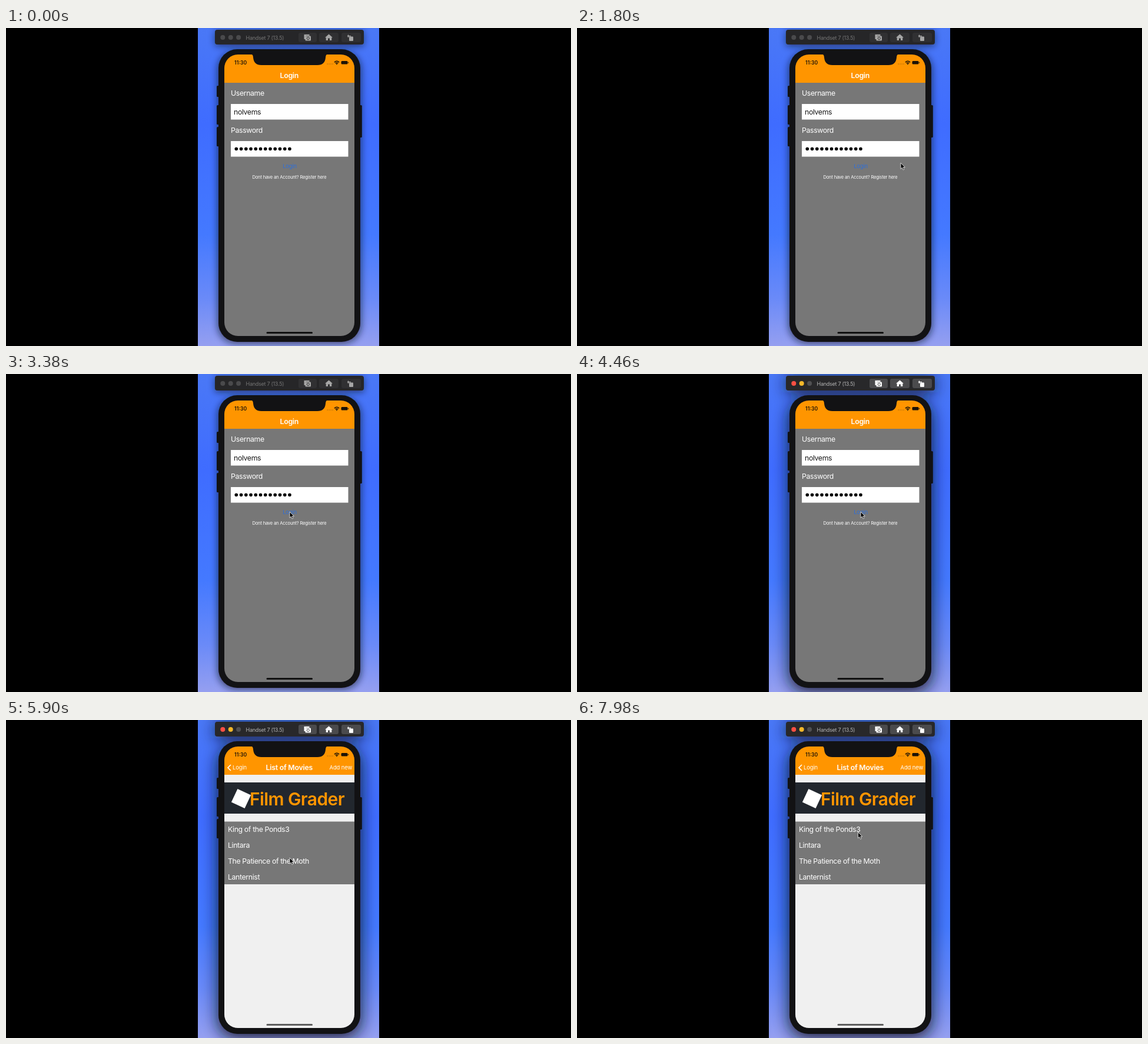
Recreate the animation shown at these times as an HTML page. Size 960 by 540 pixels, loop 8 s.

```html
<!DOCTYPE html>
<html lang="en">
<head>
<meta charset="utf-8">
<title>Phone login</title>
<style>
  html, body { margin: 0; width: 100%; height: 100%; overflow: hidden; background: #000; }
  svg { display: block; width: 960px; height: 540px; }
  text { font-family: Inter, Roboto, sans-serif; white-space: pre; }
</style>
</head>
<body>
<svg id="stage" viewBox="0 0 960 540"></svg>
<script>
const LOOP = 8000, ACTIVATE = 4240, PUSH = 5330;
const SCREEN = { x: 371, y: 45, w: 221, h: 478 };
const WHITE = '#fff', GRAY = '#777', ORANGE = '#ff9500', FRAME = '#121214', PALE = '#f0f0f0', INK = '#1c1306';

const rect = (x, y, w, h, fill, more = '') =>
  `<rect x="${x}" y="${y}" width="${w}" height="${h}" fill="${fill}" ${more}/>`;

// cy is the middle of the capital letters
function label(x, cy, str, size, { fill = WHITE, weight = 400, anchor = 'start', track = -0.03 } = {}) {
  return `<text x="${x}" y="${cy + size * 0.364}" font-size="${size}" font-weight="${weight}" fill="${fill}"
    text-anchor="${anchor}" letter-spacing="${track}em">${str}</text>`;
}

const title = (str) => label(481.3, 81, str, 12.3, { weight: 600, anchor: 'middle', track: -0.02 });

const field = (y) => rect(382, y, 199.5, 26.5, WHITE);

const bullets = Array.from({ length: 12 }, (_, i) =>
  `<circle cx="${391.3 + i * 8.24}" cy="205.3" r="2.8" fill="#000"/>`).join('');

const loginPage = rect(371, 93, 221, 430, GRAY)
  + label(382, 111, 'Username', 12.3) + field(129)
  + label(387, 142.5, 'nolvems', 12.3, { fill: '#1a1a1a' })
  + label(382, 174, 'Password', 12.3) + field(192) + bullets
  + label(482, 234.5, 'Login', 9.6, { fill: '#2f6fd8', anchor: 'middle' })
  + label(481.5, 253.5, 'Dont have an Account? Register here', 7.5, { anchor: 'middle', track: -0.02 });

const titles = ['King of the Ponds3', 'Lintara', 'The Patience of the Moth', 'Lanternist'];
const listPage = rect(371, 93, 221, 430, PALE)
  + rect(371, 106, 221, 53, '#22272e')
  + rect(387, 121, 25, 25, WHITE, 'transform="rotate(25 399.5 133.5)"')
  + label(414, 134.5, 'Film Grader', 30, { fill: ORANGE, weight: 600, track: -0.02 })
  + rect(371, 172.5, 221, 106.5, GRAY)
  + titles.map((name, i) => label(377, 186 + i * 26.7, name, 12.3)).join('');

const statusBar = label(388, 59, '11:30', 8.6, { fill: INK, weight: 600, track: 0 })
  + [546, 549, 552, 555].map(x => rect(x - .5, 60.5, 1.2, 1.2, '#9a6410')).join('')
  + `<g fill="none" stroke="${INK}" stroke-width="1.4">
       <path d="M557.8 58.2Q562 54.4 566.2 58.2M559.6 60Q562 58 564.4 60"/></g>
     <circle cx="562" cy="61.2" r="1" fill="${INK}"/>`
  + rect(569.5, 56, 11, 5.6, INK, 'rx="1.5"') + rect(581.2, 57.8, 1, 2, INK);

const toolbarIcons = (key) => `
  <g transform="translate(512.5 16)"><path d="M-6 -5H3V-3H-3V3H-6Z"/>
    <rect x="-4" y="-2.6" width="9.5" height="8" rx="1.2"/>
    <circle cx=".8" cy="1.5" r="2.1" fill="none" stroke="${key}"/></g>
  <path d="M548.5 10.5L555 16.3H553.3V21H550V17.4H547V21H543.7V16.3H542Z"/>
  <rect x="583" y="14.5" width="7" height="7.5" rx="1"/>
  <path d="M581.5 16V13.6H586" fill="none" stroke="currentColor" stroke-width="1.4"/>
  <path d="M579.7 14.2H583.4L581.5 11Z"/>`;

function toolbar(id, look) {
  const dots = look.dots.map((fill, i) => `<circle cx="${368.3 + i * 13.4}" cy="16" r="4" fill="${fill}"/>`).join('');
  const keys = [[497, 31], [532, 33], [570, 33]].map(([x, w]) => rect(x, 8, w, 16, look.key, 'rx="3"')).join('');
  return `<g id="${id}">${rect(355, 3, 253, 25, look.bar, 'rx="4"')}${dots}${keys}
    ${label(407.5, 16.3, 'Handset 7 (13.5)', 9, { fill: look.text })}
    <g fill="${look.icon}" color="${look.icon}">${toolbarIcons(look.key)}</g></g>`;
}

function shadow(id, blur, alpha, dy) {
  return `<g id="${id}" filter="url(#${blur})" opacity="${alpha}">
    ${rect(359, 36 + dy, 245, 497, '#0b1226', 'rx="32"')}${rect(355, 5, 253, 26, '#0b1226', 'rx="4"')}</g>`;
}

const blurFilter = (id, size) => `<filter id="${id}" filterUnits="userSpaceOnUse" x="280" y="-60" width="400" height="680">
  <feGaussianBlur stdDeviation="${size}"/></filter>`;

const sky = [[0, '#4a78f6'], [.3, '#3f6cff'], [.65, '#4479ff'], [.85, '#6a8af8'], [1, '#959ff0']];

const sideKeys = [[358, 98, 19], [358, 131, 33], [358, 168, 33], [600, 131, 55]]
  .map(([x, y, h]) => rect(x, y, 4.8, h, FRAME, 'rx="1.5"')).join('');

const IDLE = { bar: '#262628', key: '#303032', text: '#757575', icon: '#a6a6a6', dots: ['#4a4a4c', '#4a4a4c', '#4a4a4c'] };
const ACTIVE = { bar: '#28282a', key: '#4b4b4d', text: '#b4b4b4', icon: '#fff', dots: ['#ff5044', '#f5b82a', '#505052'] };

document.getElementById('stage').innerHTML = `
  <defs>
    <linearGradient id="sky" x1="0" y1="0" x2="0" y2="1">
      ${sky.map(([at, c]) => `<stop offset="${at}" stop-color="${c}"/>`).join('')}
    </linearGradient>
    ${blurFilter('soft', 6)}${blurFilter('wide', 13)}
    <clipPath id="desk"><rect x="326" y="0" width="308" height="540"/></clipPath>
    <clipPath id="glass"><rect x="${SCREEN.x}" y="${SCREEN.y}" width="${SCREEN.w}" height="${SCREEN.h}" rx="23"/></clipPath>
  </defs>
  ${rect(0, 0, 960, 540, '#000')}
  <g clip-path="url(#desk)">
    ${rect(326, 0, 308, 540, 'url(#sky)')}
    ${shadow('shadowIdle', 'soft', .6, 3)}
    ${shadow('shadowActive', 'wide', .85, 8)}
    ${toolbar('barIdle', IDLE)}
    ${toolbar('barActive', ACTIVE)}
    ${sideKeys}
    ${rect(361, 36, 241, 497, FRAME, 'rx="32"')}
    <g clip-path="url(#glass)">
      <g id="login">${loginPage}</g>
      ${rect(371, 93, 221, 430, '#000', 'id="shade"')}
      <g id="list">${listPage}</g>
      ${rect(371, 45, 221, 48, ORANGE)}
      <g id="loginTitle">${title('Login')}</g>
      <g id="listTitle">${title('List of Movies')}</g>
      <g id="listButtons">
        <path d="M382 76L377 81L382 86" fill="none" stroke="${WHITE}" stroke-width="1.7"/>
        ${label(385, 81, 'Login', 9.4, { track: -0.01 })}
        ${label(588, 81, 'Add new', 9.4, { anchor: 'end', track: -0.01 })}
      </g>
      ${statusBar}
      <path d="M416 44Q420 45 420 50Q421 63 434 63H529Q542 63 543 50Q543 45 547 44Z" fill="${FRAME}"/>
      ${rect(442.5, 516, 78.5, 3, '#111', 'id="home" rx="1.5"')}
    </g>
    <path id="cursor" d="M0 0V10.2L2.4 8L4 11.8L5.8 11L4.2 7.4H7.3Z" fill="#000" stroke="#f4f4f4" stroke-width=".8"/>
  </g>`;

const part = Object.fromEntries([...document.querySelectorAll('#stage [id]')].map(el => [el.id, el]));
const show = (el, alpha) => el.setAttribute('opacity', alpha);
const reveal = (el, on) => el.setAttribute('visibility', on ? 'visible' : 'hidden');
const move = (el, x, y = 0) => el.setAttribute('transform', `translate(${x} ${y})`);

// each stroke of the hand: start, end, from, to
const strokes = [
  { t0: 1350, t1: 2150, from: [650, 222], to: [482, 234] },
  { t0: 7480, t1: 7980, from: [482, 234], to: [477.5, 190.5] }
];

function cursorAt(t) {
  const { t0, t1, from, to } = t < strokes[1].t0 ? strokes[0] : strokes[1];
  const u = Math.min(1, Math.max(0, (t - t0) / (t1 - t0)));
  const k = u * u * (3 - 2 * u);
  return from.map((a, i) => a + (to[i] - a) * k);
}

// critically damped spring, settled after about half a second
function pushProgress(t) {
  const s = Math.max(0, t - PUSH) * 0.01826;
  return s > 9 ? 1 : 1 - (1 + s) * Math.exp(-s);
}

function draw(t) {
  const active = t >= ACTIVATE, p = pushProgress(t);
  reveal(part.barIdle, !active);
  reveal(part.shadowIdle, !active);
  reveal(part.barActive, active);
  reveal(part.shadowActive, active);
  move(part.login, -0.3 * SCREEN.w * p);
  move(part.list, SCREEN.w * (1 - p));
  show(part.shade, 0.07 * p);
  show(part.loginTitle, 1 - p);
  show(part.listTitle, p);
  show(part.listButtons, Math.max(0, 2 * p - 1));
  show(part.home, 1 - 0.35 * p);
  move(part.cursor, ...cursorAt(t));
}

const start = performance.now();
function tick() {
  draw((performance.now() - start) % LOOP);
  requestAnimationFrame(tick);
}
tick();
</script>
</body>
</html>
```
